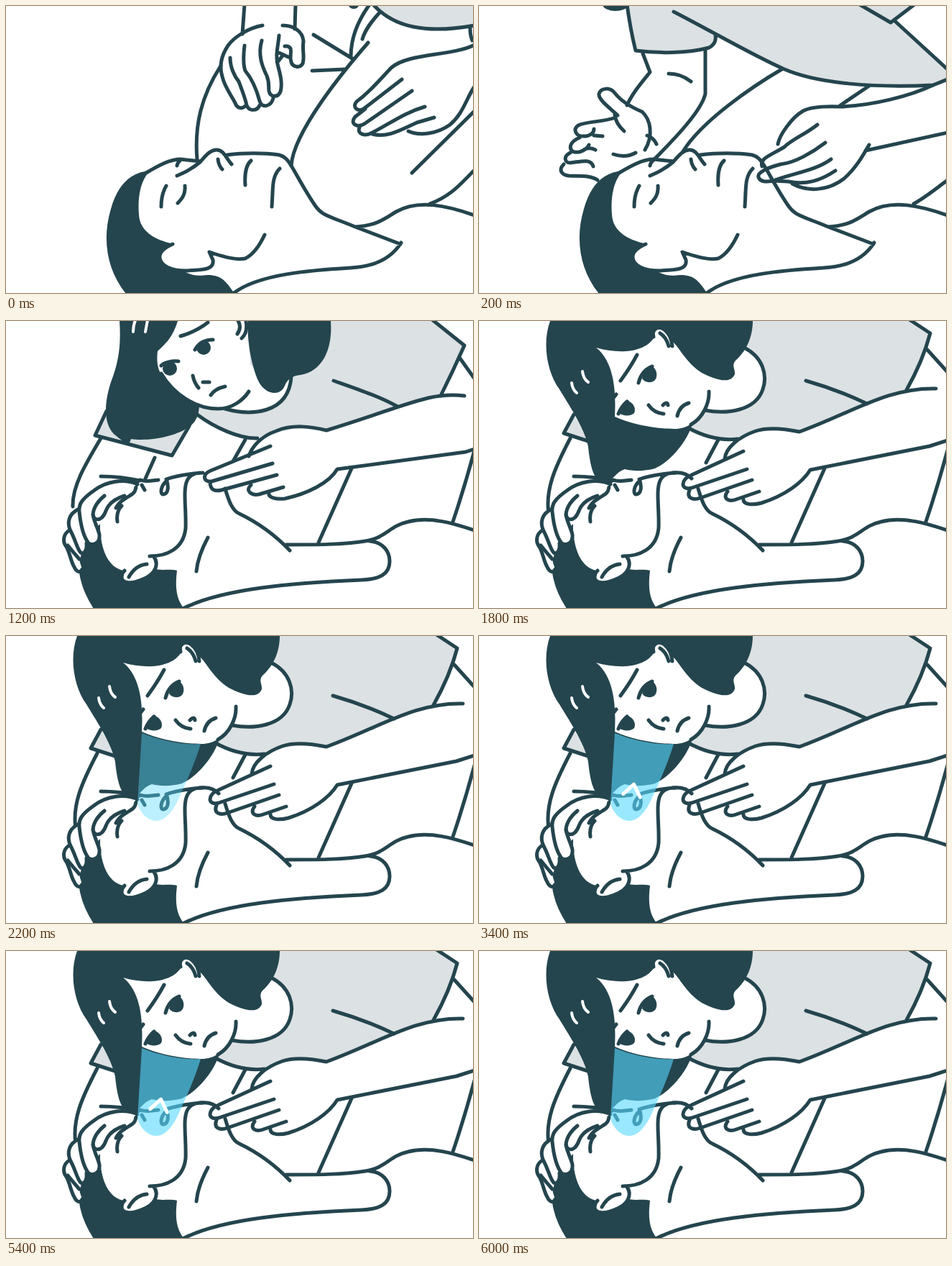
An HTML page that plays this animation: 650 by 399 pixels, repeating every 6800 ms.

```html
<!DOCTYPE html>
<html lang="en">
<head>
<meta charset="utf-8">
<title>Checking for breathing</title>
<style>
html, body { margin: 0; width: 100%; height: 100%; overflow: hidden; background: #fff; }
svg { display: block; width: 100%; height: 100%; }
path, circle, ellipse { fill: none; stroke: #24454e; stroke-width: 5; stroke-linecap: round; stroke-linejoin: round; }
.ink { fill: #24454e; stroke: none; }
.grey { fill: #dce1e3; stroke: none; }
.skin { fill: #fff; stroke: none; }
.hand { fill: #fff; }
.shine { stroke: #fff; stroke-width: 4; }
.beam { fill: #57d9ff; stroke: none; }
.breath { stroke: #fff; }
.scene { display: none; }
.on { display: inline; }
</style>
</head>
<body>
<svg viewBox="0 0 650 399" preserveAspectRatio="xMidYMid slice">

<!-- chest push -->
<g class="scene" data-on="press">
  <path class="grey" d="M511,0C540,30 585,39 652,27V0Z"/>
  <path d="M511,-2C540,30 585,39 652,27M646,31Q646,41 649,48"/>
  <circle class="ink" cx="484" cy="-4" r="8"/>
  <path d="M299,83C272,125 262,165 266,214M428,40L482,73M426,90L471,88
    M504,51C470,90 400,175 397,222M480,70C480,45 490,20 506,-2M521,8C510,20 500,32 496,46
    M565,232L652,146M590,275C620,264 635,245 652,228M332,-2L329,39M403,-2L402,32"/>
  <path d="M357,27C335,31 316,45 309,55C299,70 297,85 301,98C304,112 314,125 319,135C322,143 329,143 333,139
    M312,72C312,85 318,98 324,105C329,118 333,128 335,138C338,147 350,146 353,138
    M332,55C330,72 330,82 333,90C343,102 349,117 353,132C356,143 369,140 372,128
    M356,48C350,68 357,85 363,97C367,107 365,112 366,118C368,128 379,127 382,119C385,108 382,96 379,85C374,70 379,55 380,41
    M385,27C400,27 413,35 414,49C412,62 416,70 413,80C409,87 399,85 397,78C394,70 398,66 396,59Q393,55 388,56
    M380,65L393,71M385,69L378,78"/>
  <path d="M652,54C620,70 560,65 536,86C520,103 505,121 489,132C480,140 490,149 499,142L551,102
    M500,143L486,154C478,163 488,171 500,163L565,118
    M492,169C488,178 500,182 510,176C535,163 555,148 583,140
    M510,178C530,184 550,172 572,162L596,155
    M560,174C575,181 600,178 618,165C636,150 640,130 652,112"/>
</g>

<!-- reaching for the head -->
<g class="scene" data-on="reach">
  <path class="grey" d="M206,0L218,62C250,66 290,66 320,58Q331,52 329,39C360,56 390,73 423,87C470,108 550,114 632,110L652,102V87L580,22L604,0Z"/>
  <ellipse class="ink" cx="190" cy="-2" rx="18" ry="9"/>
  <path d="M206,-2C209,20 213,42 218,62C250,66 290,66 320,58Q331,52 329,41
    M271,8C320,33 380,68 423,87C470,108 550,114 632,110L652,102M580,22L652,88M530,-2L573,23L606,-2
    M228,66L238,92C225,108 213,122 206,138M315,60V122C310,145 275,182 242,215M264,94Q281,94 295,105
    M423,87C380,112 310,160 284,202M503,138L543,111"/>
  <path d="M193,152C180,140 166,130 167,122C170,113 183,113 189,121C200,135 215,142 227,147C239,158 243,180 231,200
    M234,180Q243,183 247,192M187,206Q204,212 218,204M189,151Q190,163 202,174
    M190,155C170,162 150,160 138,166C130,172 135,181 145,181C155,181 160,176 160,171M160,180L172,181
    M140,183C128,188 124,196 130,202C138,206 150,200 153,193M147,199Q156,196 162,200
    M127,204C117,209 119,218 127,218C140,217 155,211 159,223
    M118,220C110,228 115,235 125,236C140,237 155,235 165,242"/>
  <path d="M632,110C600,125 550,138 503,140C480,139 462,140 451,146C435,155 418,180 416,192
    M471,165C455,178 436,185 425,196C405,208 390,212 394,223
    M482,190C465,203 440,218 420,220C400,225 387,232 389,238C392,246 402,244 412,243
    M490,213C470,228 440,232 412,242M496,229C475,243 455,249 430,244L412,243
    M436,247C457,259 486,257 508,240C525,225 535,207 543,193M538,201L652,176
    M605,275C620,267 635,255 652,242"/>
</g>

<!-- patient, face up -->
<g class="scene" data-on="press reach">
  <path class="ink" d="M200,229C172,231 155,250 146,282C133,325 141,368 167,400H318C305,380 298,374 280,374C265,376 258,374 250,370C230,368 215,360 214,349C214,340 222,335 234,331C205,325 186,312 185,290C183,265 187,244 200,229Z"/>
  <path d="M195,232C212,222 228,213 243,213L271,216M238,222Q239,217 243,214
    M238,236C250,231 262,224 270,217C278,208 284,200 293,200C303,200 306,211 314,220M295,213Q296,222 301,227
    M308,207C330,204 360,204 380,207C388,209 392,214 397,222C405,235 415,255 430,277C440,292 450,292 486,307L549,331
    M550,329C540,345 520,362 480,364C430,367 350,372 316,400
    M341,215C333,222 332,235 333,249M381,226C369,238 372,255 370,279M223,250Q216,262 216,279M249,250C250,262 245,268 239,274
    M232,331C222,335 213,342 214,350C215,361 230,368 250,368C280,367 290,365 288,353L283,342C300,348 320,354 333,351C343,346 353,333 360,318
    M486,307C515,306 528,295 543,286C575,268 615,278 652,291"/>
</g>

<!-- head tilted back -->
<g class="scene" data-on="tilt">
  <path class="grey" d="M204,0L187,65C225,71 270,75 302,70Q314,55 318,34C350,50 390,70 423,87C460,103 500,107 543,109L597,81L558,37L638,0Z"/>
  <ellipse class="ink" cx="187" cy="-2" rx="15" ry="10"/>
  <path d="M205,-2Q192,35 187,65C225,71 270,75 302,70Q314,55 318,36M271,8L318,33C350,50 390,70 423,87C460,103 500,107 543,109
    M558,38L597,81M491,-2L534,46L640,-2M638,0L652,17
    M197,67C190,110 170,155 151,203M282,72C265,135 235,195 206,221M423,87C375,115 305,160 275,207
    M490,193C455,222 408,250 405,280Q404,295 407,309M605,275C620,267 635,255 652,243
    M131,288C136,276 143,268 153,259"/>
  <path d="M186,219C175,208 160,205 150,203C138,195 125,185 112,183C102,183 100,193 106,202C112,212 125,214 138,213M120,213Q139,216 147,233
    M132,222C115,231 95,233 82,237C72,243 73,252 82,256C95,260 104,254 106,248H119M120,241L118,255
    M82,257C70,262 68,274 75,280C85,284 95,281 99,272M97,270C107,268 114,272 112,281
    M73,281C62,286 61,298 70,301C85,301 95,289 113,292M68,301C63,310 66,317 78,318C92,318 102,315 110,312"/>
  <path d="M616,74C570,98 500,135 443,147C420,143 400,140 378,145C358,150 335,165 333,182
    M364,170L283,204C269,210 270,222 281,222L366,194M278,224C275,234 286,236 295,233L372,211
    M337,222C328,232 338,239 350,236L382,226M362,235C360,243 372,245 385,243C410,235 440,220 454,200C500,190 600,170 652,148"/>
</g>

<!-- looking down -->
<g class="scene" data-on="look">
  <path class="grey" d="M268,121L340,0H594L638,34L605,104C580,104 540,122 446,152C425,147 400,143 376,153L348,163C325,163 290,148 266,130Z"/>
  <path class="grey" d="M140,125L124,159L231,187L255,146Z"/>
  <path d="M140,125L124,159L231,187L255,146M266,130C290,148 325,164 350,163"/>
  <path class="skin" d="M305,122C340,132 392,130 397,78L335,60Z"/>
  <path d="M305,122C340,132 393,130 397,78"/>
  <path class="ink" d="M158,0C160,30 158,55 146,85C138,110 134,140 150,157C160,165 163,168 167,170C170,173 173,168 174,164C200,168 240,160 258,145Q268,136 269,119L250,0Z"/>
  <path class="skin" d="M239,0C232,22 224,30 211,42C209,58 212,70 218,76C232,100 262,122 295,122C315,122 330,110 342,90L336,0Z"/>
  <path class="ink" d="M337,0C335,20 340,60 352,85C362,103 382,105 388,90C392,80 400,76 410,75C440,70 455,40 452,0Z"/>
  <path d="M216,73C232,100 262,122 295,122C315,122 330,110 338,98M322,-2Q329,8 322,18M334,0Q337,16 328,24
    M243,21Q264,15 281,2M216,62C220,58 230,55 240,56M263,40C268,31 277,26 288,26
    M260,76Q262,86 268,93M274,85H283M285,103Q291,94 305,91"/>
  <circle class="ink" cx="228" cy="66" r="10"/>
  <circle class="ink" cx="275" cy="37" r="10"/>
  <path class="shine" d="M177,15Q177,6 180,-1M194,15L197,-1"/>
  <path d="M593,-2L638,34Q622,70 605,104M632,52L652,80M456,83C490,95 520,105 545,119
    M132,163C110,200 92,230 93,258M207,190L194,219M333,165L316,195"/>
  <path d="M638,104C590,98 560,117 446,152C425,147 400,143 376,153C355,160 342,175 338,188
    M368,174L285,208C273,213 274,224 286,223L371,198M284,224C284,236 292,237 300,235L377,214
    M341,228C332,236 342,243 352,241L386,231M366,238C364,246 376,248 388,247C420,240 450,225 461,206L640,182L652,178"/>
</g>

<!-- cheek above the mouth -->
<g class="scene" data-on="listen">
  <path class="grey" d="M290,149L370,0H601L628,17L595,96C550,104 510,130 446,154C420,148 400,148 385,154L358,165C330,165 310,158 290,149Z"/>
  <path class="grey" d="M132,130L118,156L156,169Z"/>
  <path d="M132,130L118,156L152,167M290,148C310,159 335,167 360,164"/>
  <path class="ink" d="M99,0C88,30 94,70 112,95C122,112 148,150 152,175C154,195 158,215 165,219C172,222 180,224 183,222C190,214 196,208 203,206C215,209 230,209 245,205C265,196 288,170 296,146L381,0Z"/>
  <path class="skin" d="M163,37C190,45 228,46 243,24C243,5 264,6 270,29L310,60L358,54Q366,46 370,37C395,50 402,75 395,95C385,125 345,130 314,124C303,140 290,150 272,150C250,150 215,145 189,133C190,110 192,60 163,37Z"/>
  <path class="ink" d="M269,28C280,38 288,58 310,72C328,81 350,89 356,74C357,67 351,62 357,55C374,40 381,20 381,0H266Z"/>
  <path d="M369,37C395,50 402,75 395,95C385,125 345,130 314,124M320,98C321,115 311,135 295,144
    M243,22C240,10 250,6 258,12Q268,20 269,35M252,17Q261,23 264,35
    M220,47Q211,64 197,83M241,63Q226,69 222,86M194,129Q198,119 206,112M187,107L191,102
    M236,117Q244,128 257,129M256,117Q262,111 263,117M276,132Q279,118 292,114"/>
  <path class="ink" d="M241,63C248,67 249,77 245,82C240,87 231,86 227,80L230,69Z"/>
  <path class="ink" d="M206,110C215,114 219,121 216,128C211,133 200,132 195,128Z"/>
  <path class="shine" d="M129,86Q130,95 136,100M144,70Q145,80 152,85"/>
  <path d="M599,-2L628,17Q618,55 595,96M624,40L652,71M455,83C490,93 515,103 540,115
    M127,163C105,205 92,235 97,268M333,165L316,197M270,211Q287,209 296,219"/>
  <path d="M636,94C570,92 520,127 446,154C422,149 400,148 385,153C362,161 343,176 342,192
    M368,181L296,214C280,220 280,236 296,232L373,206M293,235C288,248 300,249 308,246L380,221
    M346,237C338,247 348,252 358,248L390,237M368,248C368,256 382,256 393,253C425,243 450,225 461,207L627,174L652,166"/>
</g>

<!-- patient, chin lifted -->
<g class="scene" data-on="tilt look listen">
  <path class="ink" d="M131,282C108,305 97,335 104,360Q108,378 122,400H248C235,385 236,365 238,347C228,344 215,348 206,344L165,347C147,345 133,326 131,290Z"/>
  <path class="skin" d="M201,326C215,334 208,350 195,357C182,363 170,368 162,360C158,350 166,344 182,337"/>
  <path d="M206,328C213,338 208,350 195,357C182,363 168,367 162,360Q159,353 165,347M171,356C177,345 185,339 196,338
    M200,327C222,327 247,318 250,288C251,260 246,235 252,222C256,213 264,211 274,211
    M155,279Q153,265 161,257M153,260C158,250 166,247 172,243C180,239 181,234 181,228Q182,222 187,221C195,224 205,222 212,221
    M224,222C215,229 214,241 219,241C226,240 227,230 223,220C240,214 255,213 270,211M189,228L193,235
    M281,301Q267,327 265,348M305,233C310,250 315,264 325,268C350,280 375,298 395,319
    M390,311C430,311 470,311 500,306C530,301 533,285 560,279C590,271 625,282 652,291
    M506,306C525,307 534,321 534,334C534,352 520,359 495,360C400,364 300,372 246,400"/>
</g>

<!-- supporting hand -->
<g class="scene" data-on="look listen">
  <path class="hand" d="M88,291C80,296 78,306 84,314C89,322 90,334 95,342C98,349 104,351 106,345"/>
  <path class="hand" d="M100,262C88,268 84,280 90,292C97,305 99,317 104,322C109,325 113,318 112,309"/>
  <path class="hand" d="M183,227C165,219 140,222 122,236C105,248 101,255 102,265C104,285 108,300 115,309C123,313 131,308 130,297C128,288 122,278 121,269"/>
  <path d="M137,243C122,255 118,270 124,275C131,278 136,272 139,264C143,253 152,247 165,243
    M86,312Q94,322 102,331M132,216Q160,216 186,222M481,205L435,308M652,180Q638,232 622,279"/>
</g>

<path id="beam" class="beam" d="M189,135C215,146 250,152 271,150C262,180 247,212 238,231C230,247 220,257 209,257C198,257 187,247 183,233Z" opacity="0"/>
<path id="breath" class="breath" d="M-12,8L0,-8L12,8" opacity="0"/>
</svg>
<script>
const LOOP = 6800;
const poses = [[0, 'press'], [200, 'reach'], [800, 'tilt'], [1200, 'look'], [1800, 'listen']];
const glow = [[0, 0], [2000, .2], [2200, .4], [2400, .6]];
const puffs = [3400, 5400];
const puffSpots = [[214, 214], [219.5, 188], [224, 163]];

const scenes = [...document.querySelectorAll('.scene')];
const beam = document.getElementById('beam');
const breath = document.getElementById('breath');
const at = (table, t) => table.filter(row => row[0] <= t).pop()[1];

function draw(t) {
  const pose = at(poses, t);
  for (const s of scenes) s.classList.toggle('on', s.dataset.on.split(' ').includes(pose));
  beam.setAttribute('opacity', at(glow, t));
  const start = puffs.find(p => t >= p && t < p + 600);
  breath.setAttribute('opacity', start ? 1 : 0);
  if (start) {
    const [x, y] = puffSpots[Math.floor((t - start) / 200)];
    breath.setAttribute('transform', `translate(${x} ${y}) rotate(11)`);
  }
}

const begin = performance.now();
function tick() {
  draw((performance.now() - begin) % LOOP);
  requestAnimationFrame(tick);
}
tick();
</script>
</body>
</html>
```
